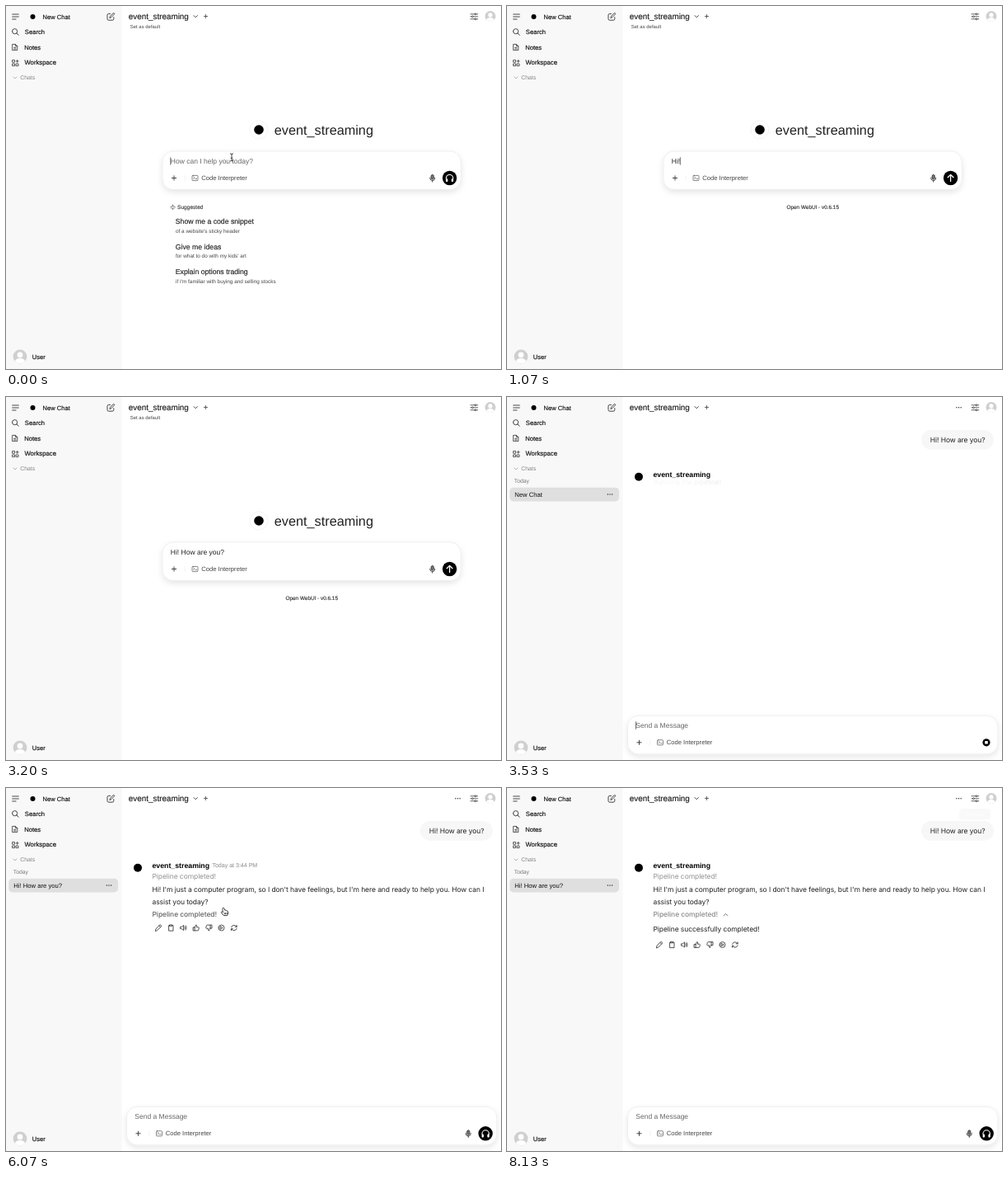
Write an HTML page that moves like this. It is 601 px wide and 440 px high and loops after 9390 ms.

```html
<!DOCTYPE html>
<html lang="en">
<head>
<meta charset="utf-8">
<title>Chat pipeline demo</title>
<style>
html, body { margin: 0; width: 100%; height: 100%; overflow: hidden; background: #fff; }
svg { display: block; width: 601px; height: 440px; }
text { font-family: "Liberation Sans", sans-serif; white-space: pre; text-rendering: geometricPrecision; }
.inter { font-family: Inter, sans-serif; letter-spacing: -.01em; }
.medium { stroke-width: .16; }
.bold { font-weight: 700; }
.w500 { font-weight: 500; }
.icon { fill: none; stroke: #333; stroke-width: .9; stroke-linecap: round; stroke-linejoin: round; }
</style>
</head>
<body>
<svg id="stage" viewBox="0 0 601 440" xmlns="http://www.w3.org/2000/svg"></svg>
<script>
const LOOP = 9390;
const BODY = 8.5;
const MESSAGE = 'Hi! How are you?';
const REPLY = [
  "Hi! I'm just a computer program, so I don't have feelings, but I'm here and ready to help you. How can I",
  'assist you today?'
].map(line => line.split(' '));

const text = (x, y, size, str, fill = '#1c1c1c', cls = '', id = '') =>
  `<text id="${id}" x="${x}" y="${y}" font-size="${size}" fill="${fill}" class="${cls}"` +
  `${cls.includes('medium') ? ` stroke="${fill}"` : ''}>${str}</text>`;
const icon = (d, attrs = '') => `<path class="icon" d="${d}" ${attrs}/>`;
const dot = (x, y, r, fill) => `<circle cx="${x}" cy="${y}" r="${r}" fill="${fill}"/>`;
const group = (id, body, attrs = '') => `<g id="${id}" ${attrs}>${body}</g>`;
const plus = (x, y, r) => icon(`M${x - r} ${y}h${2 * r}M${x} ${y - r}v${2 * r}`);
const ring = (x, y, r) => `M${x - r} ${y}a${r} ${r} 0 1 0 ${2 * r} 0a${r} ${r} 0 1 0 ${-2 * r} 0`;

const avatar = (x, y, r) => `<g transform="translate(${x} ${y}) scale(${r})">${dot(0, 0, 1, '#cfcfcf')}
  <circle cy="-.24" r=".4" fill="#fff"/><path d="M-.72 .69C-.65 .1 .65 .1 .72 .69A1 1 0 0 1-.72 .69Z" fill="#fff"/></g>`;

const sidebar = () => `<rect width="140.5" height="440" fill="#f8f8f8"/>` +
  icon('M7.7 10h7.6M7.7 13h7.6M7.7 16h4.4') + dot(32.5, 13, 3, '#000') +
  text(44.6, 15.5, 7.55, 'New Chat', '#111', 'medium') +
  icon('M126.5 9.5H124.6Q123 9.5 123 11.1V15.6Q123 17.2 124.6 17.2H129.2Q130.8 17.2 130.8 15.6V13.6M126 14.2L126.5 12.4 130.2 8.7Q131 8.3 131.5 8.9 131.9 9.5 131.4 10L127.7 13.7Z') +
  icon(ring(10.6, 30.7, 3.1) + 'M13 33L15.2 35.3') + text(22.8, 34.2, 7.65, 'Search', '#111', 'medium') +
  icon('M8 46.4H11.4L13.8 48.6V53.6H8ZM11.4 46.4V48.6H13.8M9.6 50.4h2.4M9.6 52h2.4', 'style="stroke-width:.8"') +
  text(22.2, 52.7, 7.65, 'Notes', '#111', 'medium') +
  icon('M8 65.6h2.6v2.6H8ZM8 70h2.6v2.6H8ZM12.4 70h2.6v2.6h-2.6ZM13.7 65.4v3M12.2 66.9h3', 'style="stroke-width:.8"') +
  text(22.4, 71.4, 7.75, 'Workspace', '#111', 'medium') +
  icon('M9 86l2 2 2-2', 'style="stroke:#999;stroke-width:.7"') + text(17.2, 89.4, 6.9, 'Chats', '#858585') +
  avatar(17, 425, 8.4) + text(31.8, 427.7, 7.5, 'User', '#111', 'medium');

const header = () => text(148.8, 16, 9.9, 'event_streaming', '#222', 'medium') +
  icon('M228 11.6l2.2 2.2 2.2-2.2') + `<g opacity=".8">${plus(242.5, 12.5, 2.1)}</g>` +
  icon('M564 9.8h4.6M571.4 9.8h1.4M564 12.8h1M568 12.8h4.8M564 15.8h4.6M571.4 15.8h1.4' +
    ring(570, 9.8, 1) + ring(566.5, 12.8, 1) + ring(570, 15.8, 1), 'style="stroke-width:.75"') +
  avatar(588, 12.5, 6.5);

// Input box; the tool row sits at y, with tools on the left and actions on the right.
const composer = (x, y, right, placeholder, id) => `
  <rect x="${x}" y="${y - 32.5}" width="${right - x}" height="46.5" rx="13" fill="#fff" stroke="#ebebeb" stroke-width=".8" filter="url(#shadow)"/>` +
  text(x + 9.8, y - 17.4, 8.5, placeholder, '#666', '', id + 'Hint') +
  plus(x + 14, y, 2.6) + `<path d="M${x + 27.3} ${y - 3.5}v7" stroke="#eee" stroke-width=".7"/>` +
  icon(`M${x + 37} ${y - 3.1}h5q1 0 1 1v4.2q0 1-1 1h-5q-1 0-1-1v-4.2q0-1 1-1ZM${x + 37.6} ${y - 1.4}l1.4 1.2-1.4 1.2M${x + 40} ${y + 1}h1.6`, 'style="stroke:#555;stroke-width:.7"') +
  text(x + 47.2, y + 2.5, 7.65, 'Code Interpreter', '#444') +
  group(id + 'Mic', icon(`M${right - 36.1} ${y - 2.2}q0-1.8 1.6-1.8t1.6 1.8v2q0 1.8-1.6 1.8t-1.6-1.8Z`, 'style="fill:#777"') +
    icon(`M${right - 37.6} ${y - .2}q0 3.3 3.1 3.3t3.1-3.3M${right - 34.5} ${y + 3.1}v1.6`)) +
  group(id + 'Voice', dot(right - 13.6, y, 8.7, '#000') +
    `<path d="M${right - 17.8} ${y + 1.2}v-1a4.2 4.2 0 0 1 8.4 0v1" fill="none" stroke="#fff" stroke-width="1.1"/>
     <path d="M${right - 17} ${y + 2}v1.6M${right - 10.2} ${y + 2}v1.6" stroke="#fff" stroke-width="2.4" stroke-linecap="round"/>`);

const suggestion = (y, title, note) =>
  text(205.8, y, 8.7, title, '#222', 'medium') + text(206, y + 10.4, 6.4, note, '#444');

const welcome = () => text(150.8, 27.4, 5.95, 'Set as default', '#444') +
  `<circle cx="307" cy="150" r="11" fill="#fff" stroke="#eee" stroke-width=".7"/>` + dot(307, 150, 5.8, '#000') +
  text(325.8, 155.8, 16.25, 'event_streaming', '#222') +
  composer(190, 208.5, 552.2, 'How can I help you today?', 'first') +
  group('send', dot(538.6, 208.5, 8.7, '#000') +
    icon('M538.6 212.6v-8M535.2 207.8l3.4-3.4 3.4 3.4', 'style="stroke:#fff;stroke-width:1.3"')) +
  text(199.8, 191.1, 8.5, '', '#222', '', 'typed') +
  group('ideas', icon('M202.5 241v1.6M202.5 245.2v1.6M199.8 243.9h1.6M203.8 243.9h1.6M200.8 242.2l.5.5M204.2 242.2l-.5.5M200.8 245.6l.5-.5M204.2 245.6l-.5-.5', 'style="stroke:#555;stroke-width:.8"') +
    text(208, 246.3, 6.6, 'Suggested', '#444', 'medium') +
    suggestion(264.2, 'Show me a code snippet', "of a website's sticky header") +
    suggestion(294.8, 'Give me ideas', "for what to do with my kids' art") +
    suggestion(325.3, 'Explain options trading', "if I'm familiar with buying and selling stocks")) +
  group('version', text(339.5, 246.2, 6.4, 'Open WebUI · v0.6.15', '#333', 'medium'));

const thumb = 'M-3.4-.6h1.6v4h-1.6ZM-1.8-.2L-.2-3.6Q1-3.4.8-2L.5-.8H2.6Q3.6-.7 3.4.3L2.8 2.6Q2.6 3.4 1.8 3.4H-1.8';
const toolIcons = [
  'M-3.6 3.6L-2.9 1 1.7-3.4Q2.5-3.9 3.2-3.2 3.9-2.5 3.4-1.7L-1.1 2.9ZM.9-2.6L2.6-.9',
  'M-1.4-2.9H-2.7V3.6H2.7V-2.9H1.4M-1.4-3.6H1.4V-2.2H-1.4Z',
  'M-3.6-1.2H-2.2L0-3.1V3.1L-2.2 1.2H-3.6ZM1.4-1.4Q2.4 0 1.4 1.4M2.6-2.6Q4.6 0 2.6 2.6',
  thumb, thumb,
  ring(0, 0, 3.5) + 'M-1-1.6L1.7 0-1 1.6Z',
  'M-3.3-.8Q-2.4-3.2 0-3.2 2-3.2 3.3-1.2V-3.2M3.3-1.2H1.4M3.3.8Q2.4 3.2 0 3.2-2 3.2-3.3 1.2V3.2M-3.3 1.2H-1.4'
];
const toolbar = () => toolIcons.map((d, i) =>
  icon(d, `transform="translate(${185 + 15.3 * i} 169.5)${i === 4 ? ' rotate(180)' : ''}" style="stroke:#333;stroke-width:.85"`)).join('');

const more = x => [-2.6, 0, 2.6].map(d => dot(x + d, x < 140 ? 118 : 12.8, .75, '#333')).join('');

const conversation = () =>
  text(8.8, 104, 6.8, 'Today', '#777') +
  `<rect x="3.3" y="109.8" width="132.7" height="16.6" rx="4.5" fill="#dfdfdf"/>` +
  text(9.2, 120.8, 7.7, '', '#111', '', 'chatTitle') + more(125) + more(548.5) +
  `<rect x="503" y="40" width="88" height="23.8" rx="11.9" fill="#f7f7f7"/>` +
  text(513.8, 55, BODY, MESSAGE, '#222', 'inter') +
  dot(160, 96.8, 5, '#000') + text(177.5, 96.5, 8.75, 'event_streaming', '#000', 'bold') +
  text(250.4, 96, 7.05, 'Today at 3:44 PM', '#a3a3a3', 'medium', 'stamp') +
  text(177.5, 110.4, BODY, 'Running the pipeline!', 'url(#shimmer)', 'inter', 'running') +
  text(177.5, 110.4, BODY, 'Pipeline completed!', '#939393', 'inter', 'completed') +
  REPLY.map((_, i) => text(177.5, 125.8 + 15.3 * i, BODY, '', '#222', 'inter', 'reply' + i)).join('') +
  group('details', text(177.5, 156.4, BODY, 'Pipeline completed!', '#888', 'inter w500', 'summary') +
    icon('M263 152.4l2.5 2.5 2.5-2.5', 'id="chevron" style="stroke:#777;stroke-width:1"')) +
  group('result', text(177.5, 173.6, BODY, 'Pipeline successfully completed!', '#222', 'inter'), 'clip-path="url(#reveal)"') +
  group('tools', toolbar()) +
  composer(146.5, 418.8, 595.8, 'Send a Message', 'second') +
  group('stop', dot(582, 418.8, 4.6, '#000') +
    '<rect x="580.2" y="417" width="3.6" height="3.6" rx=".6" fill="#fff"/>');

const stage = document.getElementById('stage');
stage.innerHTML = `<defs>
  <filter id="shadow" x="-10%" y="-40%" width="120%" height="200%"><feDropShadow dx="0" dy="3" stdDeviation="3.5" flood-opacity=".1"/></filter>
  <linearGradient id="shimmer" gradientUnits="userSpaceOnUse" x1="177.5" x2="342.5" y1="0" y2="0" spreadMethod="repeat">
    <stop offset=".25" stop-color="#9a9b9e"/><stop offset=".5" stop-color="#2a2929"/><stop offset=".75" stop-color="#9a9b9e"/>
  </linearGradient>
  <clipPath id="reveal"><rect id="revealBox" x="170" y="161" width="200" height="0"/></clipPath></defs>` +
  `<rect width="601" height="440" fill="#fff"/>` + sidebar() + header() +
  group('welcome', welcome()) + group('conversation', conversation()) +
  `<rect id="caret" width=".7" height="9.4" fill="#333"/>` +
  group('tooltip', '<rect x="549" y="25" width="38" height="13.5" rx="4"/>' + text(555.5, 34.2, 6.6, 'Controls', '#fff')) +
  group('pointer',
    group('beam', icon('M-1.6-4.6Q0-4.6 0-3.4 0-4.6 1.6-4.6M0-3.4V3.4M-1.6 4.6Q0 4.6 0 3.4 0 4.6 1.6 4.6M-.9 .8H.9')) +
    group('arrow', '<path d="M0 0V8.6L2 6.8 3.3 9.8 4.7 9.2 3.4 6.3H6.1Z" stroke="#fff" stroke-width=".6"/>') +
    group('hand', '<path d="M-1.6-4.6Q-.5-5.2 0-4L.7-1.8Q1.5-2.3 2-1.5 2.8-1.9 3.2-1 4.2-1.2 4.4 0L4.6 2Q4.5 3.4 3.6 4.6H-.6L-3.4 1.6Q-4.4.4-3.2 0-2.4-.1-1.6.9L-2.1-3.4Q-2.2-4.2-1.6-4.6ZM.3 1.2V3.2M1.7 1.2V3.2M3.1 1.2V3.2" fill="#fff" stroke="#111" stroke-width=".8"/>'));

const el = {};
stage.querySelectorAll('[id]').forEach(node => el[node.id] = node);

const TYPE_AT = [670, 870, 1000, 1130, 1330, 1530, 1670, 1800, 1870, 1930, 2000, 2130, 2200, 2330, 2400, 2670];
const WORDS_AT = [[4200, 2], [4270, 5], [4330, 8], [4470, 10], [4530, 13], [4670, 16], [4730, 19], [4800, 22], [4870, 25]];
const CARET_ON = [[-200, 70], [530, 3070], [3340, 3870], [4400, 4870], [5470, 5940]];
const PATH = [[5470, 274, 183], [5630, 353, 172], [5830, 318, 162], [6070, 265, 150], [7530, 265, 150],
  [7800, 450, 88], [8000, 568, 18], [8130, 580, -14]];
const SENT = 3470, DONE = 5000, OPEN = 6400;

const ramp = (t, from, to) => Math.min(1, Math.max(0, (t - from) / (to - from)));
const show = (id, visible) => el[id].style.display = visible ? '' : 'none';
const fade = (id, opacity) => el[id].style.opacity = opacity;
const overSummary = t => t >= 6000 && t < 7600;

function along(t) {
  const i = Math.max(0, PATH.findLastIndex(p => p[0] <= t));
  const a = PATH[i], b = PATH[i + 1] || a;
  const k = a === b ? 0 : ramp(t, a[0], b[0]);
  return [a[1] + (b[1] - a[1]) * k, a[2] + (b[2] - a[2]) * k];
}

function drawWelcome(t) {
  const typed = TYPE_AT.filter(at => at <= t).length;
  el.typed.textContent = MESSAGE.slice(0, typed);
  show('firstHint', !typed);
  show('ideas', !typed);
  show('firstVoice', !typed);
  show('send', typed);
  show('version', typed);
}

function drawConversation(t) {
  const done = t >= DONE, opened = t >= OPEN;
  el.chatTitle.textContent = done ? MESSAGE : 'New Chat';
  show('secondMic', done);
  show('secondVoice', done);
  show('stop', !done);
  show('tools', done);

  const enter = ramp(t, 3510, 3730);
  show('running', t < 4930);
  show('completed', t >= 4930);
  fade('running', enter);
  el.running.setAttribute('transform', `translate(0 ${-4.5 * (1 - enter)})`);
  el.shimmer.setAttribute('gradientTransform', `translate(${82.5 * (t - 3500) / 1000} 0)`);

  let words = WORDS_AT.reduce((n, [at, count]) => at <= t ? count : n, 0);
  REPLY.forEach((line, i) => {
    el['reply' + i].textContent = line.slice(0, words).join(' ');
    words = Math.max(0, words - line.length);
  });

  show('details', t >= 4930);
  el.summary.setAttribute('fill', overSummary(t) ? '#666' : '#8c8c8c');
  el.chevron.setAttribute('transform', opened ? 'rotate(180 265.5 153.6)' : '');
  const open = 1 - Math.pow(1 - ramp(t, OPEN - 40, 6800), 4);
  el.revealBox.setAttribute('height', 20.5 * open);
  el.tools.setAttribute('transform', `translate(0 ${20.5 * open})`);
  show('stamp', t >= 5530 && t < 7870);
}

function drawPointer(t) {
  const start = t < TYPE_AT[0];
  const [x, y] = start ? [274, 183.5] : along(t);
  show('pointer', start || t >= 5470 && t < 8130);
  el.pointer.setAttribute('transform', `translate(${x} ${y})`);
  show('beam', start);
  show('hand', overSummary(t));
  show('arrow', !start && !overSummary(t));
  fade('tooltip', .02 * ramp(t, 8040, 8130));
}

function drawCaret(t) {
  const sent = t >= SENT;
  el.caret.setAttribute('x', sent ? 156 : 199.5 + el.typed.getComputedTextLength());
  el.caret.setAttribute('y', sent ? 393.3 : 183.3);
  fade('caret', Math.max(...CARET_ON.map(([on, off]) => ramp(t, on, on + 130) * (1 - ramp(t, off, off + 130)))));
}

function draw(now) {
  const t = now % LOOP, sent = t >= SENT;
  show('welcome', !sent);
  show('conversation', sent);
  if (sent) drawConversation(t); else drawWelcome(t);
  drawPointer(t);
  drawCaret(t);
}

const began = performance.now();
function tick() {
  draw(performance.now() - began);
  requestAnimationFrame(tick);
}
tick();
</script>
</body>
</html>
```
